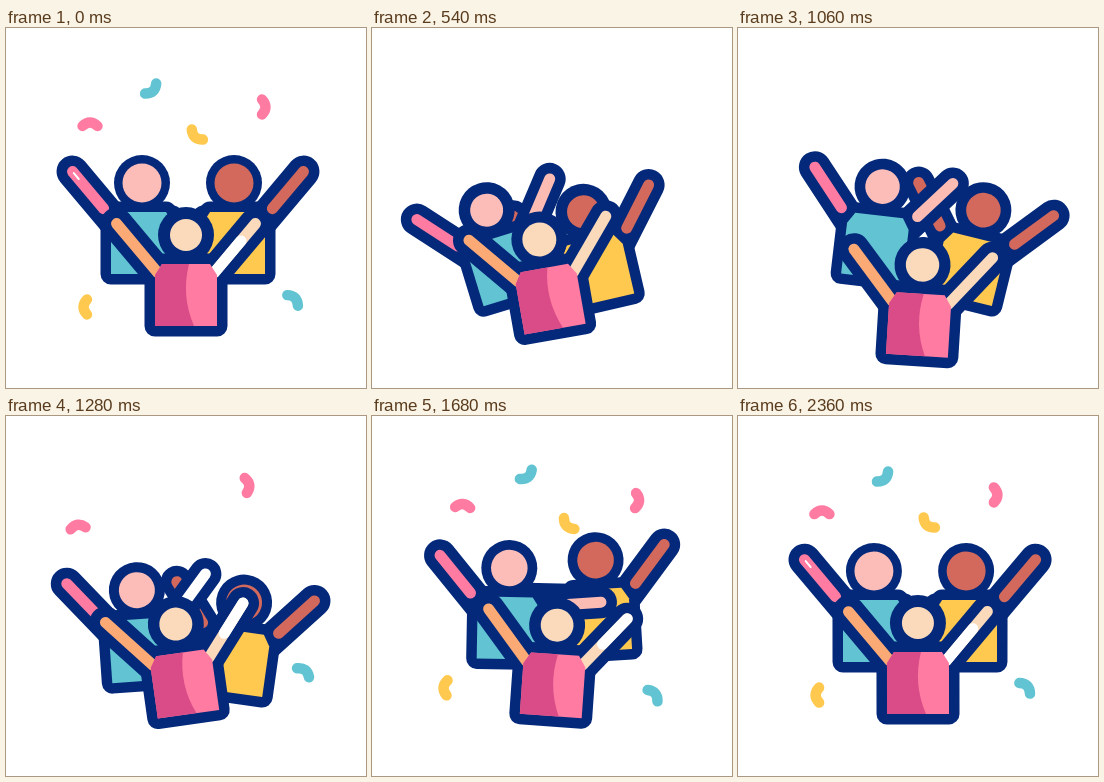
Recreate the animation shown at these times as an HTML page with a canvas. Size 360 by 360 pixels, loop 2.4 s.

```html
<!DOCTYPE html>
<html lang="en">
<head>
<meta charset="utf-8">
<title>Cheering friends</title>
<style>
  html, body { margin: 0; width: 100%; height: 100%; overflow: hidden; background: #fff; }
  canvas { display: block; }
</style>
</head>
<body>
<canvas id="stage" width="360" height="360"></canvas>
<script>
const ctx = document.getElementById('stage').getContext('2d');
const LOOP = 2400, NAVY = '#04297a', WHITE = '#fff';
const PINK = '#ff7ba2', TEAL = '#62c4d2', YELLOW = '#ffc94f', BROWN = '#d2695c', CREAM = '#fbdabb';

// Shared key times; every track holds one value per time.
const TIMES = [0, 270, 540, 690, 840, 1090, 1280, 1480, 1680, 1840, 1980, 2180, 2400];
const tracks = {
  leftTurn:  [0, -5, -17, -8, 7, 6, -4, -6, 1, 1.5, 1, -0.5, 0],
  leftDrop:  [0, 14, 24, 0, -19, 6, 19, 6, -3, 2, 6, 1, 0],
  rightTurn: [0, 6, -13, -14, -5, 15, 8, -5, -3.5, 3, 4.5, 2, 0],
  rightDrop: [0, 24, 27, -4, -6, 28, 31, -6, -11, 1, 7, 1, 0],
  frontTurn: [0, 0, -10, 4, 14, 2, -8, -2, 4, 3, 1, -0.5, 0],
  frontDrop: [0, 36, 3.5, -20, -5, 31, 0.5, -8, 2, 8, 2, 0, 0],
  innerArm:  [150, 60, 40, 40, 40, 40, 40, 55, 85, 115, 140, 150, 150],
  swell:     [0, 0.6, 1, 1, 1, 0.7, 0.5, 0.45, 0.4, 0.3, 0.2, 0.1, 0]
};

// Smooth cubic curve through the keys, flat at both ends of the loop.
function sample(values, t) {
  const last = TIMES.length - 1;
  let i = 0;
  while (i < last - 1 && t >= TIMES[i + 1]) i++;
  const slope = k => k === 0 || k === last ? 0
    : (values[k + 1] - values[k - 1]) / (TIMES[k + 1] - TIMES[k - 1]);
  const span = TIMES[i + 1] - TIMES[i], u = (t - TIMES[i]) / span;
  const u2 = u * u, u3 = u2 * u;
  return values[i] * (2 * u3 - 3 * u2 + 1) + values[i + 1] * (3 * u2 - 2 * u3)
    + span * (slope(i) * (u3 - 2 * u2 + u) + slope(i + 1) * (u3 - u2));
}

const rad = deg => deg * Math.PI / 180;
const clamp = v => Math.max(0, Math.min(1, v));

function disc(x, y, r, color) {
  ctx.fillStyle = color;
  ctx.beginPath();
  ctx.arc(x, y, r, 0, 2 * Math.PI);
  ctx.fill();
}

function polygon(points) {
  ctx.beginPath();
  for (const [x, y] of points) ctx.lineTo(x, y);
  ctx.closePath();
}

// Part of an arm, from fraction a to b of the way from shoulder to hand.
function arm(side, tilt, a, b, width, color) {
  const dx = side * Math.sin(rad(tilt)) * 64.5, dy = -Math.cos(rad(tilt)) * 64.5;
  ctx.strokeStyle = color;
  ctx.lineWidth = width;
  ctx.beginPath();
  ctx.moveTo(side * 28 + dx * a, -35 + dy * a);
  ctx.lineTo(side * 28 + dx * b, -35 + dy * b);
  ctx.stroke();
}

function figure(x, y, turn, p) {
  const { tilts, arms, start } = p;
  ctx.save();
  ctx.translate(x, y);
  ctx.rotate(rad(turn));

  arm(-1, tilts[0], 0, 1, 32, NAVY);
  arm(1, tilts[1], 0, 1, 32, NAVY);
  const torso = [[-24, -44], [24, -44], [31, -33], [31, 18], [-31, 18], [-31, -33]];
  polygon(torso);
  ctx.lineWidth = 21;
  ctx.strokeStyle = NAVY;
  ctx.stroke();

  arm(-1, tilts[0], start, 1, 11, arms[0]);
  arm(1, tilts[1], start, 1, 11, arms[1]);
  if (p.detail) p.detail();

  polygon(torso);
  ctx.fillStyle = p.shirt;
  ctx.fill();
  if (p.shade) {
    ctx.fillStyle = p.shade;
    ctx.beginPath();
    ctx.moveTo(-24, -44);
    ctx.lineTo(3, -44);
    ctx.quadraticCurveTo(-5, -12, 8, 18);
    ctx.lineTo(-31, 18);
    ctx.lineTo(-31, -33);
    ctx.fill();
  }
  disc(0, -73, 28, NAVY);
  disc(0, -73, p.face, p.skin);
  ctx.restore();
}

// x, y, rotation, colour, time of appearance
const confetti = [
  [84, 96, 0, PINK, 1120], [258, 79, 90, PINK, 1120], [288, 271, 45, TEAL, 1120],
  [146, 62, 138, TEAL, 1300], [190, 108, 222, YELLOW, 1340], [79, 279, 270, YELLOW, 1380]
];

function drawConfetti(t, turn) {
  ctx.save();
  ctx.translate(180, 190);
  ctx.rotate(rad(turn));
  for (const [x, y, angle, color, birth] of confetti) {
    const size = t < 600 ? 1 - clamp(t / 240) : clamp((t - birth) / 120);
    if (size <= 0) continue;
    ctx.save();
    ctx.translate(x - 180, y - 190);
    ctx.rotate(rad(angle));
    ctx.scale(size, size);
    ctx.strokeStyle = color;
    ctx.lineWidth = 10.5;
    ctx.beginPath();
    ctx.moveTo(-7.5, 2);
    ctx.quadraticCurveTo(0, -5, 7.5, 2);
    ctx.stroke();
    ctx.restore();
  }
  ctx.restore();
}

function draw(t) {
  const now = {};
  for (const name in tracks) now[name] = sample(tracks[name], t);
  const resting = t < 60 || t > 2250;
  const glowing = t > 1120 && t < 1800;
  const backFace = 19.5 - 3 * now.swell;

  ctx.fillStyle = WHITE;
  ctx.fillRect(0, 0, 360, 360);
  ctx.lineCap = ctx.lineJoin = 'round';
  drawConfetti(t, now.frontTurn);

  figure(228, 228 + now.rightDrop, now.rightTurn, {
    tilts: [now.innerArm, 40], arms: [BROWN, BROWN], start: 0.25,
    shirt: YELLOW, skin: BROWN, face: backFace
  });
  figure(136, 228 + now.leftDrop, now.leftTurn, {
    tilts: [40, now.innerArm], start: 0.25,
    arms: [PINK, t > 1120 && t < 1480 ? WHITE : '#fcbcb4'],
    shirt: TEAL, skin: '#fcbdb8', face: backFace,
    detail() { if (resting) arm(-1, 40, 0.85, 0.97, 2, WHITE); }
  });
  figure(180, 280 + now.frontDrop, now.frontTurn, {
    tilts: [40, 40], arms: ['#fbaa75', CREAM], start: 0,
    shirt: PINK, shade: '#d94c87', skin: CREAM, face: 16 + now.swell,
    detail() {
      if (resting) arm(1, 40, 0, 0.65, 11, WHITE);
      if (glowing) arm(1, 40, 0.45, 1, 11, WHITE);
    }
  });
}

function tick() {
  draw(performance.now() % LOOP);
  requestAnimationFrame(tick);
}
tick();
</script>
</body>
</html>
```
